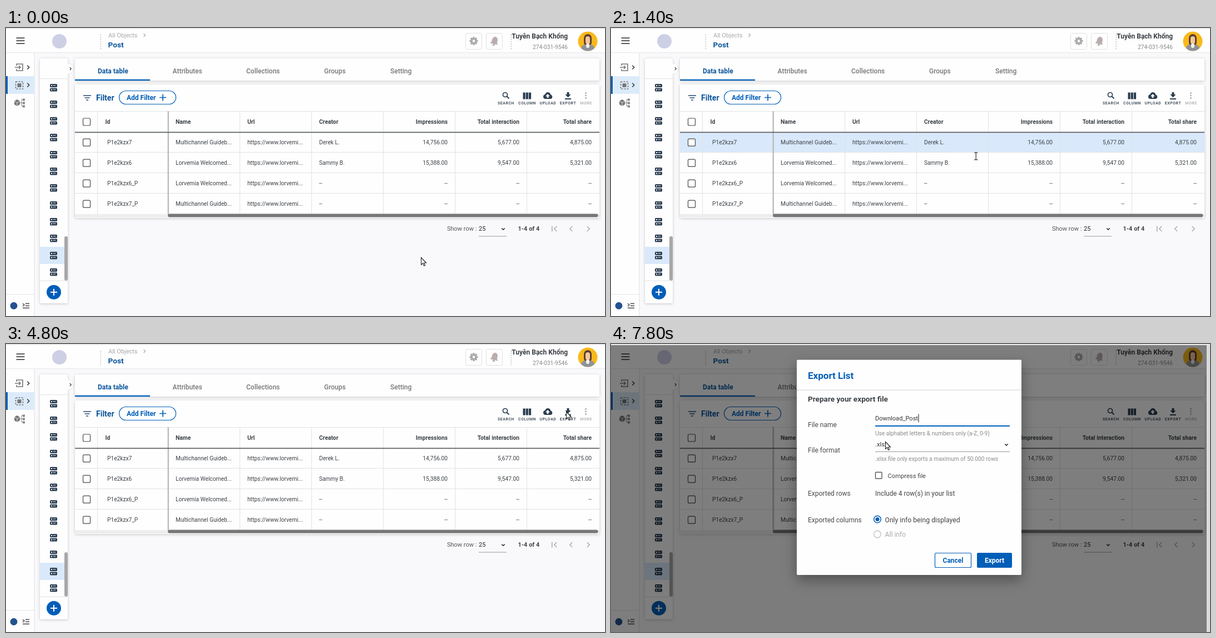
Write an HTML page with a canvas that moves like this. It is 1077 px wide and 520 px high and loops after 8000 ms.

```html
<!DOCTYPE html>
<html lang="en">
<head>
<meta charset="utf-8">
<title>Export list</title>
<style>
html, body { margin: 0; width: 100%; height: 100%; overflow: hidden; background: #f9f9fb; }
canvas { display: block; }
</style>
</head>
<body>
<canvas id="stage" width="1077" height="520"></canvas>
<script>
const ctx = document.getElementById('stage').getContext('2d');
const LOOP = 8000, STEP = 200, MODAL_AT = 5000;
const BLUE = '#005eb8', NAVY = '#2b3c50', INK = '#3c4146', GREY = '#8b8b8b', RULE = '#e2e2e2', TINT = '#d9e9fb';
const ROW_TOP = 189, ROW_H = 36.8;

// Pointer path: time, x, y
const PATH = [
  [0, 746, 414], [400, 746, 414], [600, 718, 318], [800, 668, 222], [1000, 655, 213],
  [1200, 655, 213], [2200, 661, 305], [2600, 850, 350], [2800, 918, 361], [3400, 930, 352],
  [3600, 990, 136], [4400, 1007, 122], [4800, 1007, 122], [5000, 709, 145],
  [5400, 640, 135], [5800, 474, 135], [6000, 493, 176], [8000, 493, 176]
];
const OLD_NAME = 'post_02_08_2022_11_03_32', NEW_NAME = 'Download_Post';

function pointerAt(t) {
  t = Math.max(0, t);
  const i = Math.max(1, PATH.findIndex(p => p[0] >= t));
  const [t0, x0, y0] = PATH[i - 1], [t1, x1, y1] = PATH[i];
  const k = (t - t0) / (t1 - t0);
  return [x0 + (x1 - x0) * k, y0 + (y1 - y0) * k];
}

function box(x, y, w, h, fill, radius = 0, stroke, width = 1) {
  ctx.beginPath();
  ctx.roundRect(x, y, w, h, radius);
  if (fill) { ctx.fillStyle = fill; ctx.fill(); }
  if (stroke) { ctx.strokeStyle = stroke; ctx.lineWidth = width; ctx.stroke(); }
}

function disc(x, y, r, fill, stroke, width = 1) {
  ctx.beginPath();
  ctx.arc(x, y, r, 0, Math.PI * 2);
  if (fill) { ctx.fillStyle = fill; ctx.fill(); }
  if (stroke) { ctx.strokeStyle = stroke; ctx.lineWidth = width; ctx.stroke(); }
}

function icon(x, y, d, stroke, width = 1.5, fill) {
  const path = new Path2D(d);
  ctx.save();
  ctx.translate(x, y);
  if (fill) { ctx.fillStyle = fill; ctx.fill(path); }
  if (stroke) { ctx.strokeStyle = stroke; ctx.lineWidth = width; ctx.stroke(path); }
  ctx.restore();
}

// y is the middle of the capitals
function text(str, x, y, size, color = INK, weight = 400, align = 'left') {
  ctx.font = `${weight} ${size}px Roboto, sans-serif`;
  ctx.textAlign = align;
  ctx.fillStyle = color;
  ctx.fillText(str, x, Math.round(y + size * 0.36));
  return ctx.measureText(str).width;
}

function card(x, y, w, h, radius = 2) {
  ctx.save();
  ctx.shadowColor = 'rgba(0,0,0,.2)';
  ctx.shadowBlur = 5;
  ctx.shadowOffsetY = 1;
  box(x, y, w, h, '#fefefe', radius);
  ctx.restore();
}

function chevron(x, y, size, dir, color, width = 1.5) {
  const s = size * dir;
  icon(x, y, `M${-s / 2} ${-size}L${s / 2} 0L${-s / 2} ${size}`, color, width);
}

const caretDown = (x, y) => icon(x, y, 'M-2.7 -1.5L0 1.2L2.7 -1.5', '#222', 1.5);
const plus = (x, y, r, color, width) => icon(x, y, `M${-r} 0H${r}M0 ${-r}V${r}`, color, width);
const checkbox = (x, y) => box(x - 6.5, y - 6.5, 13, 13, '#fff', 2, '#4a4a4a', 1.2);

function dots(x) {
  for (let y = 12; y <= 36; y += 4) box(x - 0.5, y, 1.5, 2, '#c4c4c4');
}

function drawHeader() {
  box(0, 2, 1077, 43, '#fefefe');
  box(0, 0, 1077, 1.5, '#e6e6e6');
  box(0, 44, 1077, 1, '#e6e6e6');
  icon(26, 23, 'M-7.5 -5H7.5M-7.5 0H7.5M-7.5 5H7.5', '#5c5c5c', 2);
  disc(96, 24, 13, '#cdcfe5');
  dots(170);
  text('All Objects', 184, 13, 11, '#a8a8a8');
  chevron(249, 13, 3, 1, '#aaa', 1.2);
  text('Post', 183.5, 30, 13.7, '#0b559c', 700);

  for (const x of [826.5, 863.5]) box(x, 9.5, 29, 29, '#fefefe', 3, '#e0e0e0');
  ctx.save();
  ctx.translate(841, 23.5);
  for (let i = 0; i < 8; i++) {
    box(-1.7, -7.5, 3.4, 5, '#aaa', 0.5);
    ctx.rotate(Math.PI / 4);
  }
  disc(0, 0, 4, null, '#aaa', 3.2);
  ctx.restore();
  ctx.save();
  ctx.translate(878.5, 23.5);
  ctx.rotate(0.25);
  icon(0, 0, 'M-7 5.5L-5 2V-2Q-4.5 -7 0 -8Q4.5 -7 5 -2V2L7 5.5Z', null, 0, '#b9adad');
  disc(0, 7, 2, '#b9adad');
  ctx.restore();

  dots(908);
  text('Tuyên Bạch Khổng', 1010, 15, 12, '#3b3f44', 700, 'right');
  text('274-031-9546', 1010, 34, 10.2, '#8a8a8a', 400, 'right');
  ctx.save();
  disc(1046, 24, 17.5, '#f8b91c');
  ctx.clip();
  box(1039, 11, 14, 22, '#60402f', 7);
  box(1034, 30, 24, 16, '#8d939a', 7);
  box(1042, 15, 8, 14, '#f1c7a0', 4);
  box(1043, 28, 6, 8, '#f6efe5', 3);
  ctx.restore();
}

function drawSidebars() {
  box(0, 45, 51, 475, '#fefefe');
  box(50.5, 45, 1, 475, '#e0e0e0');
  icon(24, 71, 'M-5 -3V-6H6V6H-5V3M-8 0H2M-1 -3L2 0L-1 3', '#777', 1.6);
  chevron(40, 71, 3.5, 1, '#333');
  box(0, 87, 51, 32, '#dcebfa');
  box(0, 87, 3, 32, BLUE);
  ctx.setLineDash([3, 2]);
  box(17.5, 97, 13, 13, null, 0, '#777', 1.6);
  ctx.setLineDash([]);
  box(20.5, 100, 7, 7, '#777', 1);
  chevron(40, 103, 3.5, 1, '#333');
  icon(20, 135, 'M-5 -3L0 -6L5 -3V3L0 6L-5 3Z', null, 0, '#777');
  icon(20, 135, 'M-5 -3L0 0L5 -3M0 0V6', '#fff', 0.8);
  icon(24, 135, 'M4 -6V6M1 0H8M4 -6H8M4 6H8', '#888', 1);
  for (const y of [127.5, 133.5, 139.5]) box(30, y, 4, 4, '#888');
  box(0, 480.5, 51, 1, '#e4e4e4');
  disc(14, 501.5, 6.5, '#24528f');
  icon(36, 501.5, 'M-6 -4L-3 -1.5L-6 1M-1 -4H6M-1 0H6M-6 4H6', '#444', 1.4);

  card(61, 55, 50, 442);
  box(61, 91, 50, 1, RULE);
  box(61, 395, 45, 31, TINT);
  for (let i = 0; i < 12; i++) {
    const y = Math.round(107.5 + i * 30.3);
    for (const top of [y - 7, y + 0.5]) {
      box(79, top, 13, 6, NAVY, 1.5);
      box(81, top + 2, 2, 2, '#fff');
      box(84.5, top + 2, 5, 1.5, '#a7b1bd');
    }
  }
  box(105, 376, 6, 80, '#a7a7a7', 3);
  box(61, 456, 50, 1, RULE);
  disc(86, 477, 13, BLUE);
  plus(86, 477, 6, '#fff', 2);
  ctx.save();
  ctx.beginPath();
  ctx.rect(111, 60, 13, 26);
  ctx.clip();
  disc(112, 73.5, 9.5, '#fefefe', '#e6e6e6');
  ctx.restore();
  chevron(116, 73.5, 2.5, 1, '#444', 1.2);
}

function drawToolbar() {
  icon(146, 126, 'M-7 -4H7M-4.5 0H4.5M-2 4H2', '#24466f', 1.5);
  text('Filter', 162, 126, 14, '#0b559c', 700);
  box(203.5, 113.5, 102, 24, '#fff', 12, BLUE, 1.2);
  text('Add Filter', 217, 125.5, 12, BLUE, 700);
  plus(282, 125.5, 6, BLUE, 1.7);

  disc(897.5, 120.5, 4, null, NAVY, 1.7);
  icon(898, 122, 'M2.5 1.5L6.5 5.5', NAVY, 2);
  for (let i = 0; i < 3; i++) box(929.5 + i * 5.2, 116.5, 4.2, 12, NAVY);
  icon(974, 122, 'M-4 6Q-8 6 -8 2Q-8 -1.5 -4.8 -2Q-3 -6 0 -6Q4.5 -6 5.3 -1.5Q8.3 -1 8.3 2.5Q8 6 4.5 6Z', null, 0, NAVY);
  icon(974, 122, 'M0 -3L4 1.2H1.5V4H-1.5V1.2H-4Z', null, 0, '#fff');
  icon(1010.5, 122, 'M-2 -6H2V-2H5L0 3.5L-5 -2H-2ZM-5.5 5H5.5V7H-5.5Z', null, 0, NAVY);
  for (const y of [117.5, 122, 126.5]) disc(1042.5, y, 1.4, '#a9a9a9');
  ctx.letterSpacing = '0.6px';
  const labels = [['SEARCH', 899], ['COLUMN', 937], ['UPLOAD', 974.5], ['EXPORT', 1010.5], ['MORE', 1043, '#b5b5b5']];
  for (const [label, x, color] of labels) text(label, x, 135.5, 6.9, color || '#4b5563', 700, 'center');
  ctx.letterSpacing = '0px';
}

const COLUMNS = [['Name', 305], ['Url', 434], ['Creator', 563], ['Impressions', 794, 1], ['Total interaction', 923, 1], ['Total share', 1053, 1]];
const POST_A = 'Multichannel Guideb...', POST_B = 'Lorvemia Welcomed...', LINK = 'https://www.lorvemi...';
const ROWS = [
  ['P1e2kzx7', POST_A, LINK, 'Derek L.', '14,756.00', '5,677.00', '4,875.00'],
  ['P1e2kzx6', POST_B, LINK, 'Sammy B.', '15,388.00', '9,547.00', '5,321.00'],
  ['P1e2kzx6_P', POST_B, LINK, '--', '--', '--', '--'],
  ['P1e2kzx7_P', POST_A, LINK, '--', '--', '--', '--']
];

function drawTable(hover) {
  card(124, 102, 943, 241);
  drawToolbar();
  if (hover >= 0) box(124, Math.round(ROW_TOP + hover * 37 - 1), 943, 37, TINT);
  box(124, 150, 943, 1, RULE);
  for (const y of [224, 261, 298]) box(124, y, 943, 1, RULE);
  for (const x of [164, 420, 549, 678, 807, 936]) box(x, 150, 1, 186, RULE);
  box(290.5, 150, 2.5, 186, '#bdbdbd');
  box(124, 187.5, 943, 1.7, '#5d6063');

  checkbox(145, 169.5);
  text('Id', 178.5, 169, 10.3, INK, 700);
  for (const [label, x, right] of COLUMNS) text(label, x, 169, 10.3, INK, 700, right ? 'right' : 'left');
  ROWS.forEach(([id, ...cells], r) => {
    const y = 206.7 + r * 37;
    checkbox(145, y);
    text(id, 182, y, 10.2);
    cells.forEach((cell, c) => text(cell, COLUMNS[c][1], y, 10.2, INK, 400, COLUMNS[c][2] ? 'right' : 'left'));
  });
  box(124, 336, 943, 6, '#ededed');
  box(291, 335.5, 773.5, 6, '#777', 3);
}

function drawPage(hover) {
  box(0, 0, 1077, 520, '#f9f9fb');
  drawHeader();
  drawSidebars();
  card(124, 55, 943, 40);
  box(124, 92.7, 135, 2.3, BLUE);
  text('Data table', 165, 77.5, 12, '#0b559c', 700);
  const tabs = [['Attributes', 299.5], ['Collections', 432], ['Groups', 572], ['Setting', 691]];
  for (const [label, x] of tabs) text(label, x, 77.5, 12, '#777', 500);
  drawTable(hover);

  text('Show row :', 793, 362.5, 11, '#555');
  text('25', 850, 362.5, 11, '#222');
  caretDown(894, 363);
  box(850, 375.5, 50, 1, '#999');
  text('1-4 of 4', 920.5, 362.5, 11, '#444', 700);
  box(981, 357.5, 1.5, 10, '#aaa');
  chevron(988, 362.5, 4.5, -1, '#aaa');
  chevron(1016, 362.5, 4.5, -1, '#aaa');
  chevron(1047, 362.5, 4.5, 1, '#aaa');
}

function drawFileName(t) {
  const focused = t >= 5400, typing = t >= 6000;
  const count = typing ? Math.ceil((t - 6000) / 1800 * NEW_NAME.length) : 0;
  const value = typing ? NEW_NAME.slice(0, count) : OLD_NAME;
  ctx.font = '400 11.1px Roboto, sans-serif';
  const full = ctx.measureText(value).width;
  if (t >= 5600 && !typing) {
    const start = t >= 5800 ? 475 : 557;
    box(start, 127, 475 + full - start, 15, '#a9cdf5');
  }
  text(value, 475, 134, 11.1, '#333');
  if (t === 5400 || typing) box(475 + full + 0.5, 126.5, 1, 15, '#111');
  box(475, focused ? 147 : 148, 242, focused ? 2 : 1, focused ? BLUE : '#999');
}

function drawModal(t) {
  box(0, 2, 1071, 518, 'rgba(0,0,0,.5)');
  box(1071, 2, 6, 518, '#dcdcdc');
  ctx.save();
  ctx.shadowColor = 'rgba(0,0,0,.35)';
  ctx.shadowBlur = 24;
  ctx.shadowOffsetY = 9;
  box(334, 28.5, 404, 388.5, '#fefefe', 2);
  ctx.restore();

  text('Export List', 354, 57, 17, BLUE, 700);
  box(334, 82.5, 404, 1, '#d2d2d2');
  text('Prepare your export file', 354, 99.5, 13.6, INK, 700);
  const labels = [['File name', 146], ['File format', 192], ['Exported rows', 269.5], ['Exported columns', 318]];
  for (const [label, y] of labels) text(label, 354, y, 12, '#4a4a4a');

  drawFileName(t);
  text('Use alphabet letters & numbers only (a-Z, 0-9)', 475, 161.5, 10.2, GREY);
  text('.xlsx', 475, 181.5, 11.1, '#333');
  caretDown(711, 182);
  box(475, 194, 242, 1, '#999');
  text('.xlsx file only exports a maximum of 50.000 rows', 475, 207.5, 10.2, GREY);
  box(475.5, 231.5, 11.5, 11.5, '#fff', 1, '#555', 1.4);
  text('Compress file', 497.5, 237.5, 11.2, '#444');
  text('Include 4 row(s) in your list', 475, 269.5, 12, '#444');
  disc(479, 316.5, 6.3, '#fff', BLUE, 1.5);
  disc(479, 316.5, 3.6, BLUE);
  text('Only info being displayed', 492.5, 317.5, 12.2, '#444');
  disc(479, 343.5, 6.3, '#fff', '#bbb', 1.2);
  text('All info', 492.5, 344, 12.2, '#aaa');

  box(582.5, 377.5, 65, 26, '#fff', 2, BLUE, 1.2);
  text('Cancel', 615, 391, 12, BLUE, 700, 'center');
  box(658, 377, 63, 27, BLUE, 2);
  text('Export', 689.5, 391, 12, '#fff', 700, 'center');
}

function drawPointer(x, y, beam) {
  if (beam) {
    const d = 'M-3 -6.5H-1L0 -5.5L1 -6.5H3M0 -5.5V5.5M-3 6.5H-1L0 5.5L1 6.5H3';
    icon(x, y, d, '#fff', 2.6);
    icon(x, y, d, '#222', 1.1);
  } else {
    icon(x, y, 'M0.5 0.5V13.5L3.5 10.7L5.6 15.5L7.6 14.6L5.5 10H9.5Z', '#222', 1.1, '#fff');
  }
}

function rowAt([, y]) {
  const row = Math.floor((y - ROW_TOP) / ROW_H);
  return row >= 0 && row < 4 ? row : -1;
}

function draw(now) {
  const t = Math.floor(now % LOOP / STEP) * STEP;
  const modal = t >= MODAL_AT;
  const [x, y] = pointerAt(t);
  // The row highlight trails the pointer by one step
  drawPage(modal ? -1 : rowAt(pointerAt(t - STEP)));
  if (modal) drawModal(t);
  const overField = x < 705 && y > 125 && y < 148;
  drawPointer(x, y, modal ? overField : rowAt([x, y]) >= 0);
  requestAnimationFrame(draw);
}
requestAnimationFrame(draw);
</script>
</body>
</html>
```
